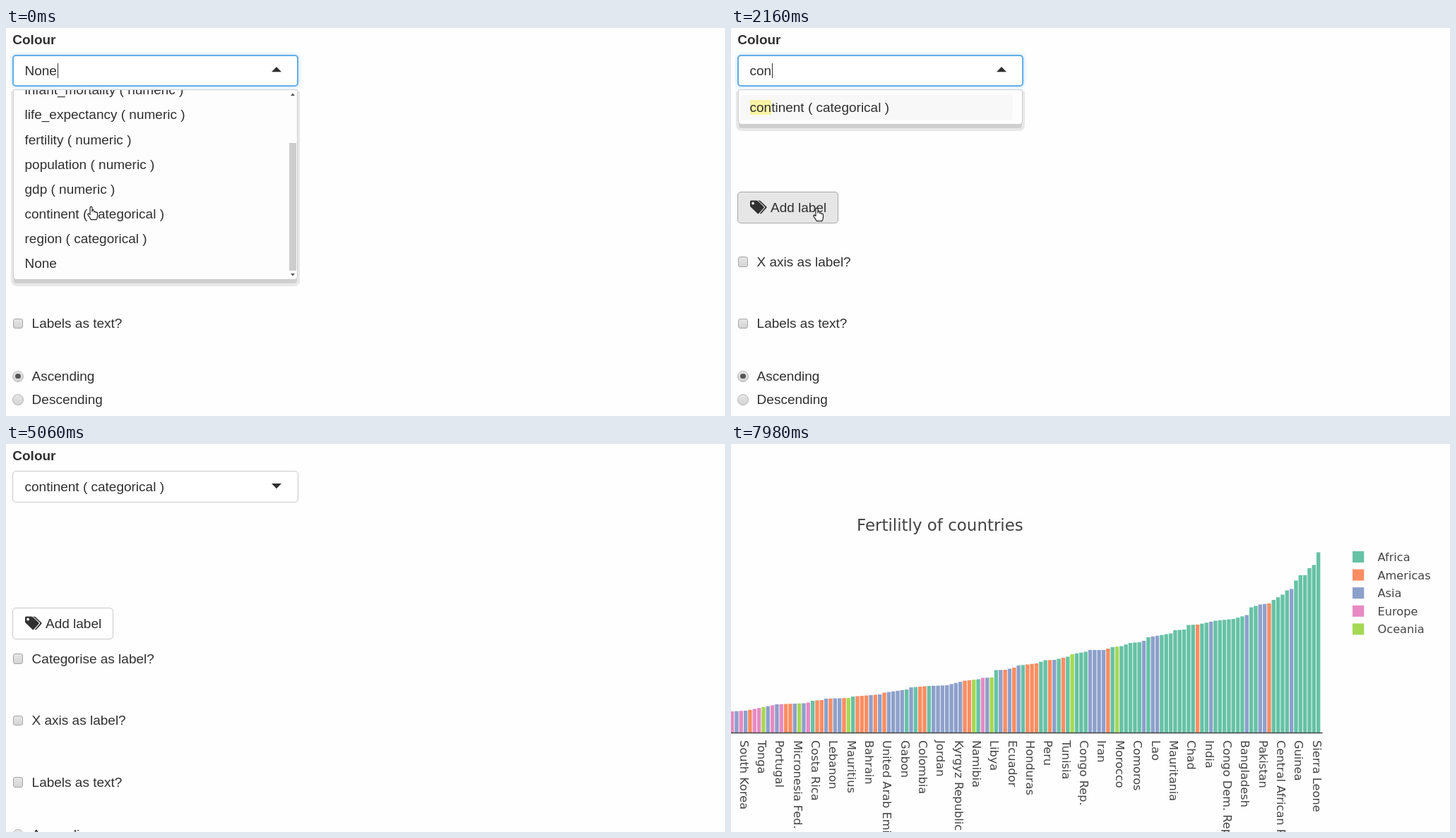
Recreate the animation shown at these times as an HTML page. Size 1018 by 550 pixels, loop 8.26 s.

```html
<!DOCTYPE html>
<html lang="en">
<head>
<meta charset="utf-8">
<title>Colour picker and bar chart</title>
<style>
html, body { margin: 0; width: 100%; height: 100%; overflow: hidden; background: #fefefe; }
#stage { position: absolute; left: 0; top: 0; width: 1018px; height: 550px; overflow: hidden;
  font: 19px/24px "Liberation Sans", Arial, sans-serif; color: #303030; }
#stage div, #stage svg { position: absolute; box-sizing: border-box; white-space: pre; }
#form, #chart, #lower, #cursor { left: 0; top: 0; width: 1018px; height: 550px; }
#extra, #options, #bar { left: 0; top: 0; }
#control { left: 9px; top: 38px; width: 405px; height: 45px; border: 1.5px solid #c8c8c8;
  border-radius: 5px; background: #fff; }
#control.focus { border: 2px solid #62aee8; box-shadow: 0 0 5px 1px rgba(102, 175, 233, .35); }
#value { left: 26.5px; top: 48.5px; }
#caret { display: inline-block; width: 1.5px; height: 21px; margin-left: .8px;
  vertical-align: middle; margin-top: -2px; background: #303030; }
#list { left: 10px; top: 87px; width: 403px; border: 1px solid #cdcdcd; border-radius: 0 0 5px 5px;
  background: #fdfdfd; overflow: hidden;
  box-shadow: 0 6px 0 -1px #cfcfcf, 0 6px 0 3px #e8e8e8; }
.option { left: 3px; width: 385px; height: 35px; line-height: 35px; padding-left: 12.5px; }
.option.on { background: #f8f8f8; }
.option mark { background: #f8f3a4; color: inherit; }
#thumb { left: 390px; width: 10px; height: 181px; background: #cdcdcd; }
#button { left: 9px; top: 232px; width: 143px; height: 45px; border: 1.5px solid #c8c8c8;
  border-radius: 5px; background: #fff; }
#button.on { background: #e6e6e6; border-color: #a8a8a8; }
.box, .radio { left: 9.5px; width: 14.5px; height: 14.5px; border: 1px solid #a6a6a6;
  border-radius: 3px; background: linear-gradient(#e6e6e6, #d4d4d4); }
.radio { left: 9px; width: 16px; height: 16px; border-radius: 50%; border-color: #b4b4b4; }
.dot { left: 3.2px; top: 3.2px; width: 7.6px; height: 7.6px; border-radius: 50%; background: #555; }
#chart { background: #fefefe; }
#chart text { font: 16.2px "DejaVu Sans", Verdana, sans-serif; fill: #444; }
#chart .title { font-size: 22.95px; }
</style>
</head>
<body>
<div id="stage">
  <div id="form">
    <div style="left:9.3px;top:5px;font-weight:bold">Colour</div>
    <div id="button"></div>
    <svg style="left:0;top:0" width="160" height="290" fill="#303030">
      <path fill-rule="evenodd" d="M27 246q0-1.6 1.6-1.6h7.2q1.2 0 2.2.9l8.2 7.8q1 1.1 0 2.2l-6.8 7.4q-1 1-2.1 0l-9.4-9q-.9-.9-.9-2zM29.2 248.5a1.9 1.9 0 1 0 3.8 0a1.9 1.9 0 1 0-3.8 0"/>
      <path d="M38.4 244.4h1.4q1 0 2 .9l8.2 7.8q1 1.1 0 2.2l-6.8 7.4q-1.2 1.2-2.4.2l7-7.8q.9-1 0-2z"/>
    </svg>
    <div style="left:56px;top:242.5px">Add label</div>
    <div id="extra"></div>
    <div id="lower"></div>
    <div id="control"></div>
    <div id="value"><span id="typed"></span><span id="caret"></span></div>
    <svg style="left:376px;top:55px" width="14" height="9"><path id="arrow" fill="#303030"/></svg>
    <div id="list">
      <div id="options"></div>
      <div id="bar">
        <div id="thumb"></div>
        <svg style="left:390px;top:0" width="12" height="268" fill="#555">
          <path d="M2 8l3-3.4 3 3.4zM2 260l3 3.4 3-3.4z"/>
        </svg>
      </div>
    </div>
  </div>
  <svg id="chart" viewBox="0 0 1018 550"></svg>
  <svg id="cursor" viewBox="0 0 1018 550">
    <g id="pointer" fill="#fff" stroke="#222" stroke-width="1.2" stroke-linejoin="round">
      <path id="hand" d="M-1.5 10.5V1Q-1.5-.6 0-.6T1.5 1V6.2Q3-.0 4.4 6.8Q6 5.4 6.8 7.6Q9 6.6 9 9V12.5Q9 15 7.4 17.6H-.3Q-1.6 15-3.8 12.2Q-5.4 9.6-3.8 9.2Q-2.6 9.2-1.5 10.5Z"/>
      <path id="tip" d="M0 0V13L3 10.3L5.2 15.2L7.2 14.3L5 9.4H9Z"/>
    </g>
  </svg>
</div>
<script>
const $ = id => document.getElementById(id);
const show = (id, on) => { $(id).style.display = on ? '' : 'none'; };
const LOOP = 8260, SCROLL = 92.6, ROW = 35.1;
const CHOICE = 'continent ( categorical )';
const OPTIONS = [
  'country ( categorical )', 'year ( categorical )', 'infant_mortality ( numeric )',
  'life_expectancy ( numeric )', 'fertility ( numeric )', 'population ( numeric )',
  'gdp ( numeric )', CHOICE, 'region ( categorical )', 'None'
];

// Each step changes part of the state; the rest carries over.
const STEPS = [
  [0, { typed: 'None', caret: 1, scroll: SCROLL, query: '', row: -1, open: 1, focus: 1,
        moved: 0, hover: 1, chart: 0, camera: 1 }],
  [150, { typed: '', scroll: 50 }],
  [290, { scroll: 12 }],
  [420, { scroll: 0 }],
  [690, { caret: 0 }],
  [1220, { caret: 1 }],
  [1360, { row: 4 }],
  [1760, { caret: 0, row: 5 }],
  [1890, { typed: 'c', caret: 1 }],
  [2030, { typed: 'co', query: 'co', row: 0 }],
  [2160, { typed: 'con', query: 'con' }],
  [2290, { typed: 'cont', query: 'cont' }],
  [2820, { caret: 0 }],
  [2960, { typed: CHOICE, open: 0 }],
  [3090, { focus: 0, moved: 1 }],
  [3860, { hover: 0 }],
  [6030, { chart: 1 }],
  [7850, { camera: .5 }],
  [7980, { camera: 0 }]
];

// time, shape, x, y
const PATH = [
  [0, 'hand', 120.5, 254], [420, 'hand', 121.5, 256], [3490, 'hand', 236, 278],
  [3610, 'hand', 381.5, 310], [3730, 'tip', 520, 308], [3860, 'tip', 610, 305],
  [3990, 'tip', 668, 304], [4120, 'tip', 684, 304], [4250, 'tip', 679, 303],
  [4380, 'tip', 664, 302], [4510, 'tip', 652, 301], [4630, 'tip', 664, 330],
  [4760, 'tip', 708, 400], [4930, 'tip', 762, 486], [5060, ''],
  [6030, 'tip', 904.5, 317], [6180, 'tip', 918, 306], [6330, 'tip', 942, 290],
  [6470, 'tip', 972, 276], [6620, 'tip', 992, 272], [6760, 'tip', 998, 276],
  [6900, 'tip', 990, 288], [7050, 'tip', 968, 304], [7170, 'tip', 930, 326],
  [7310, 'tip', 870, 364], [7440, 'tip', 790, 412], [7580, 'tip', 700, 464],
  [7710, 'tip', 610, 516], [7850, '']
];

function choice(y, label, kind, inner = '') {
  const half = kind === 'radio' ? 8 : 7.25;
  return `<div class="${kind}" style="top:${y - half}px">${inner}</div>` +
    `<div style="left:36.6px;top:${y - 12}px">${label}</div>`;
}

function buildForm() {
  $('extra').innerHTML = choice(304.5, 'Categorise as label?', 'box');
  $('lower').innerHTML =
    choice(331.5, 'X axis as label?', 'box') +
    choice(419.2, 'Labels as text?', 'box') +
    choice(493.5, 'Ascending', 'radio', '<div class="dot"></div>') +
    choice(527.3, 'Descending', 'radio');
}

const COLOURS = { A: '#66c2a5', M: '#fc8d62', S: '#8da0cb', E: '#e78ac3', O: '#a6d854' };
const REGIONS = { A: 'Africa', M: 'Americas', S: 'Asia', E: 'Europe', O: 'Oceania' };
const BARS = 'ESESMEEOSE SEMMSOSEAM MSMSSMOAMM MSMSMSSSSA SAMMASSSSS SSMMOAESOA SMSMSAMMMA ' +
  'AMSAMAOAAA SSSSMAOAAA AASASSAAAA AAAAMAASAA AAAAASAASS MAAAASAAAA AA';
// bar index and top edge; bars between are interpolated
const TOPS = [
  [0, 379], [3, 378], [7, 373], [10, 369], [16, 367.5], [17, 366.5], [18, 364], [20, 363],
  [21, 361], [26, 360], [27, 358], [33, 355], [34, 352.5], [39, 348], [40, 345], [44, 343],
  [48, 342], [52, 335.5], [55, 333.5], [56, 331.5], [58, 331], [59, 320.5], [61, 320],
  [63, 317], [64, 314], [68, 311], [70, 306.5], [72, 306], [75, 301.5], [76, 298],
  [79, 294.5], [80, 292], [83, 292], [85, 288], [87, 286.5], [89, 282], [91, 281],
  [92, 279], [93, 274], [98, 268.5], [99, 264], [101, 263], [102, 256.5], [104, 256],
  [108, 250.5], [112, 248], [115, 242.5], [116, 231.5], [118, 227.5], [120, 226],
  [121, 221], [123, 213.5], [124, 207.5], [125, 205.5], [126, 193.5], [127, 186],
  [128, 186], [129, 176], [130, 171.5], [131, 153.5]
];
const TICKS = ('South Korea,Tonga,Portugal,Micronesia Fed.,Costa Rica,Lebanon,Mauritius,Bahrain,' +
  'United Arab Emirates,Gabon,Colombia,Jordan,Kyrgyz Republic,Namibia,Libya,Ecuador,Honduras,' +
  'Peru,Tunisia,Congo Rep.,Iran,Morocco,Comoros,Lao,Mauritania,Chad,India,Congo Dem. Rep.,' +
  'Bangladesh,Pakistan,Central African Rep.,Guinea,Sierra Leone').split(',');

function topAt(i) {
  const n = Math.max(1, TOPS.findIndex(p => p[0] >= i));
  const [i0, y0] = TOPS[n - 1], [i1, y1] = TOPS[n];
  return y0 + (y1 - y0) * (i - i0) / (i1 - i0);
}

function buildChart() {
  const barX = i => 1.6 + 6.336 * i;
  const rect = (x, y, w, h, fill) =>
    `<rect x="${x}" y="${y}" width="${w}" height="${h}" fill="${fill}"/>`;
  let out = '<text class="title" x="178" y="123">Fertilitly of countries</text>';
  [...BARS.replace(/ /g, '')].forEach((key, i) => {
    const y = topAt(i);
    out += rect(barX(i) - 2.7, y, 5.4, 409 - y, COLOURS[key]);
  });
  out += rect(0, 408.8, 837.5, 1.5, '#444');
  TICKS.forEach((name, i) => {
    out += `<text transform="translate(${barX(3 + 4 * i) - 8} 420) rotate(90)">${name}</text>`;
  });
  Object.keys(REGIONS).forEach((key, i) => {
    const y = 160 + 25.6 * i;
    out += rect(880, y - 8, 16.3, 16, COLOURS[key]) +
      `<text x="915.5" y="${y + 6}">${REGIONS[key]}</text>`;
  });
  out += '<g id="camera"><path fill="#c8c8c8" d="M983 116.5h4l1.5-2.5h6.5l1.5 2.5h4q2 0 2 2v10.5' +
    'q0 2-2 2h-17.5q-2 0-2-2v-10.5q0-2 2-2z"/>' +
    '<circle cx="991.7" cy="123.6" r="4" fill="#c8c8c8" stroke="#fefefe" stroke-width="2.2"/></g>';
  $('chart').innerHTML = out;
}

function drawList(s) {
  const n = s.query.length;
  const rows = OPTIONS.filter(o => o.startsWith(s.query));
  const pad = n ? 6.5 : 4.7;
  $('list').style.height = (n ? 15 + ROW * rows.length : 270) + 'px';
  $('options').innerHTML = rows.map((o, i) =>
    `<div class="option${i === s.row ? ' on' : ''}" style="top:${pad + ROW * i - s.scroll}px">` +
    `<mark>${o.slice(0, n)}</mark>${o.slice(n)}</div>`).join('');
  show('bar', !n);
  $('thumb').style.top = 13 + 62 * s.scroll / SCROLL + 'px';
}

function drawState(s) {
  $('typed').textContent = s.typed;
  $('caret').style.visibility = s.caret ? 'visible' : 'hidden';
  $('control').className = s.focus ? 'focus' : '';
  $('arrow').setAttribute('d', s.open ? 'M0 7.3L7 0L14 7.3Z' : 'M0 1H14L7 8.3Z');
  show('list', s.open);
  drawList(s);
  $('button').className = s.hover ? 'on' : '';
  show('extra', s.moved);
  $('lower').style.top = s.moved ? '60.4px' : '0';
  show('form', !s.chart);
  show('chart', s.chart);
  $('camera').setAttribute('opacity', s.camera);
}

function drawCursor([, shape, x = 0, y = 0]) {
  show('hand', shape === 'hand');
  show('tip', shape === 'tip');
  $('pointer').setAttribute('transform', `translate(${x} ${y})`);
}

const lastIndex = (table, t) => table.filter(step => step[0] <= t).length - 1;
let step = -1, spot = -1;

function draw(t) {
  const a = lastIndex(STEPS, t), b = lastIndex(PATH, t);
  if (a !== step) drawState(Object.assign({}, ...STEPS.slice(0, a + 1).map(p => p[1])));
  if (b !== spot) drawCursor(PATH[b]);
  step = a;
  spot = b;
}

buildForm();
buildChart();
const start = performance.now();
function tick() {
  draw((performance.now() - start) % LOOP);
  requestAnimationFrame(tick);
}
tick();
</script>
</body>
</html>
```
